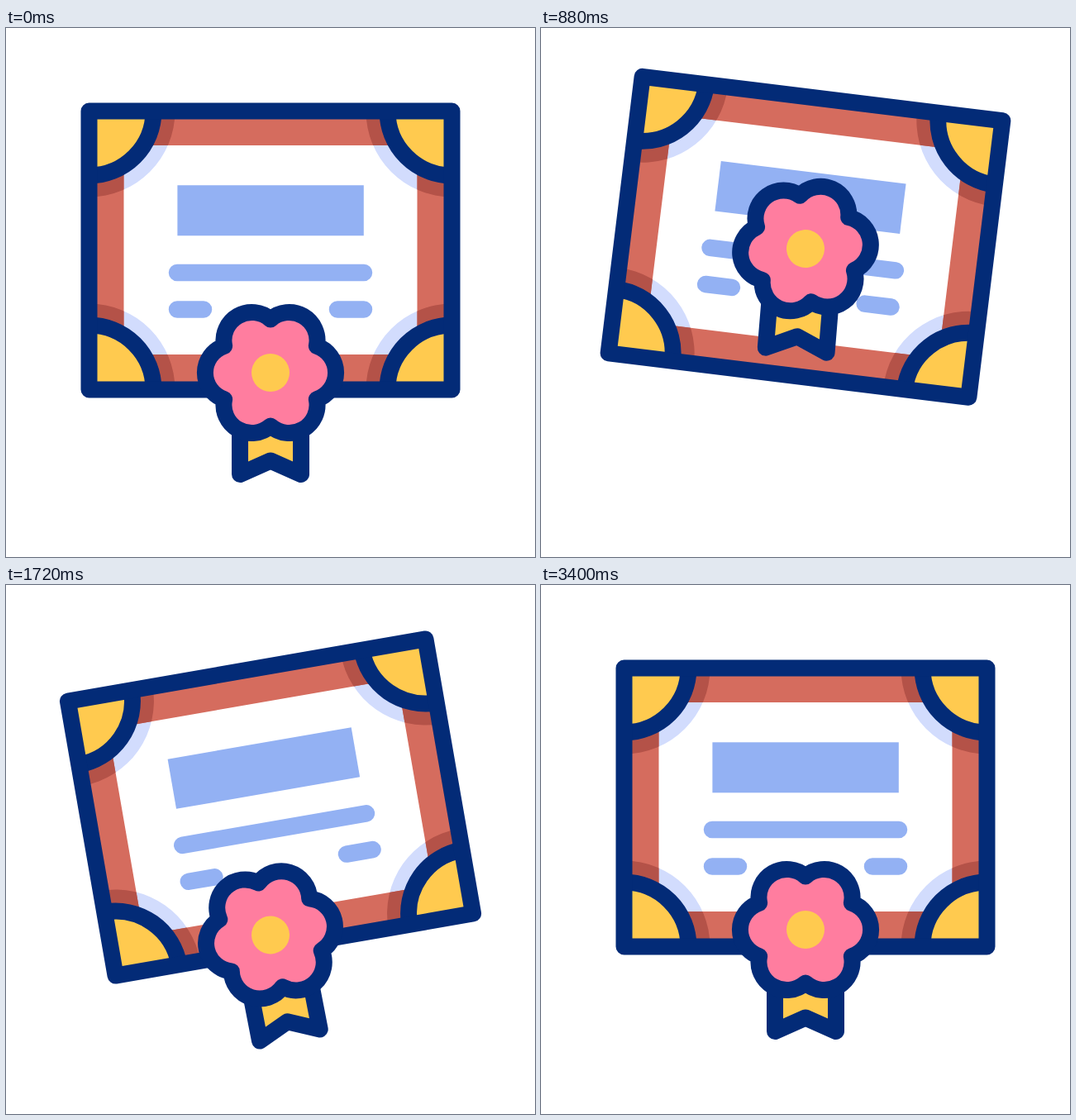
An HTML page for the animation above (3.6 s loop, 640 px wide and 640 px high).

```html
<!DOCTYPE html>
<html lang="en">
<head>
<meta charset="utf-8">
<title>Certificate</title>
<style>
  html, body { margin: 0; width: 100%; height: 100%; overflow: hidden; background: #fff; }
  svg { display: block; width: 100vw; height: 100vh; }
  .line { fill: none; stroke: #032b77; stroke-width: 20; stroke-linejoin: round; }
  .text { fill: none; stroke: #93b1f3; stroke-width: 20.5; stroke-linecap: round; }
  .gold { fill: #ffca4f; }
  .pink { fill: #ff7d9f; }
  #rays { stroke: #ffca4f; stroke-width: 20; stroke-linecap: round; }
</style>
</head>
<body>
<svg viewBox="0 0 640 640">
  <defs>
    <rect id="sheet" x="-219.5" y="-168.5" width="439" height="337"/>
    <path id="border" fill-rule="evenodd"
      d="M-219.5-168.5h439v337h-439zM-177.5-127h355v253h-355z"/>
    <clipPath id="inSheet"><use href="#sheet"/></clipPath>
    <clipPath id="inBorder"><use href="#border" clip-rule="evenodd"/></clipPath>
  </defs>
  <g id="cert">
    <use href="#sheet" fill="#fff"/>
    <g clip-path="url(#inSheet)">
      <g class="corners" data-r="104" fill="#d2dcfd"></g>
      <use href="#border" fill="#d56c5e"/>
      <g clip-path="url(#inBorder)"><g class="corners" data-r="104" fill="#b45248"></g></g>
      <g class="corners gold" data-r="78" stroke="#032b77" stroke-width="20"></g>
    </g>
    <use href="#sheet" class="line"/>
    <rect x="-112.6" y="-78.7" width="225.4" height="61" fill="#93b1f3"/>
    <path class="text" d="M-113 27H113M-113 71.5H-81M81 71.5H113"/>
  </g>
  <g id="rays"></g>
  <g id="ribbon">
    <path class="line gold" d="M-37 25V123L0 106.5L37 123V25z"/>
  </g>
  <g id="seal">
    <path id="flower" class="line pink"/>
    <circle class="gold" r="23"/>
  </g>
</svg>
<script>
const LOOP = 3600;
const { PI, sin, cos, min, max } = Math;
const $ = id => document.getElementById(id);

function add(parent, tag, attrs = {}) {
  const el = document.createElementNS('http://www.w3.org/2000/svg', tag);
  return set(parent.appendChild(el), attrs);
}

function set(el, attrs) {
  for (const k in attrs) el.setAttribute(k, attrs[k]);
  return el;
}

for (const g of document.querySelectorAll('.corners'))
  for (const x of [-1, 1]) for (const y of [-1, 1])
    add(g, 'circle', { cx: x * 219.5, cy: y * 168.5, r: g.dataset.r });

// Six petals: arcs between the corners of a hexagon
const petals = [...Array(7).keys()].map(i => {
  const a = (i * 60 - 30) * PI / 180;
  return `${64.5 * cos(a)} ${64.5 * sin(a)}`;
});
set($('flower'), { d: 'M' + petals.join('A34 34 0 0 1 ') + 'z' });

const rays = [];
for (const side of [-1, 1]) for (const v of [-1, 0, 1]) rays.push({
  el: add($('rays'), 'line'),
  x: 326.5 + side * 167, y: 262.5 + v * 31.5,
  dx: side * (v ? 30 : 42.5), dy: v * 26.5
});

// Progress from a to b, plain and eased at both ends
const span = (t, a, b) => min(1, max(0, (t - a) / (b - a)));
const ease = (t, a, b) => (1 - cos(PI * span(t, a, b))) / 2;

// Eased travel through a few [time, value] turning points, from zero
const through = (...points) => t => points.reduce(
  ([t0, v0, sum], [t1, v1]) => [t1, v1, sum + (v1 - v0) * ease(t, t0, t1)], [0, 0, 0])[2];

const sealLift = through([170, 70], [830, -153], [1470, 40], [1810, 0]);
const ribbonSwing = through([560, 92], [1060, -30], [1400, 8], [1700, -11], [2320, 0]);

function place(id, x, y, turn) {
  set($(id), { transform: `translate(${x} ${y}) rotate(${turn})` });
}

function draw(t) {
  const hop = span(t, 0, 1120);
  const wobble = span(t, 1285, 2405);
  const tilt = -9 * sin(2 * PI * hop ** 1.85) + 10 * sin(4 * PI * wobble);
  place('cert', 320, 269 - 42 * sin(PI * hop) ** 2, tilt);

  const sealY = 417 + sealLift(t);
  place('seal', 320, sealY, -13 * (ease(t, 700, 1080) - ease(t, 1740, 2160)));

  // The ribbon hangs a little below the middle of the seal and sways
  const swing = ribbonSwing(t);
  const sway = 11 * sin(2 * PI * span(t, 0, 1700));
  place('ribbon', 320 + sway, sealY + 23 * (1 - cos(swing * PI / 180)), swing);

  $('rays').style.display = t > 2480 && t < 3400 ? '' : 'none';
  const head = 1 - (1 - span(t, 2480, 2950)) ** 2;
  const tail = span(t, 3050, 3400) ** 1.5;
  for (const { el, x, y, dx, dy } of rays) set(el, {
    x1: x + dx * tail, y1: y + dy * tail,
    x2: x + dx * head, y2: y + dy * head
  });
}

const start = performance.now();
function tick() {
  draw(max(0, performance.now() - start) % LOOP);
  requestAnimationFrame(tick);
}
draw(0);
requestAnimationFrame(tick);
</script>
</body>
</html>
```
